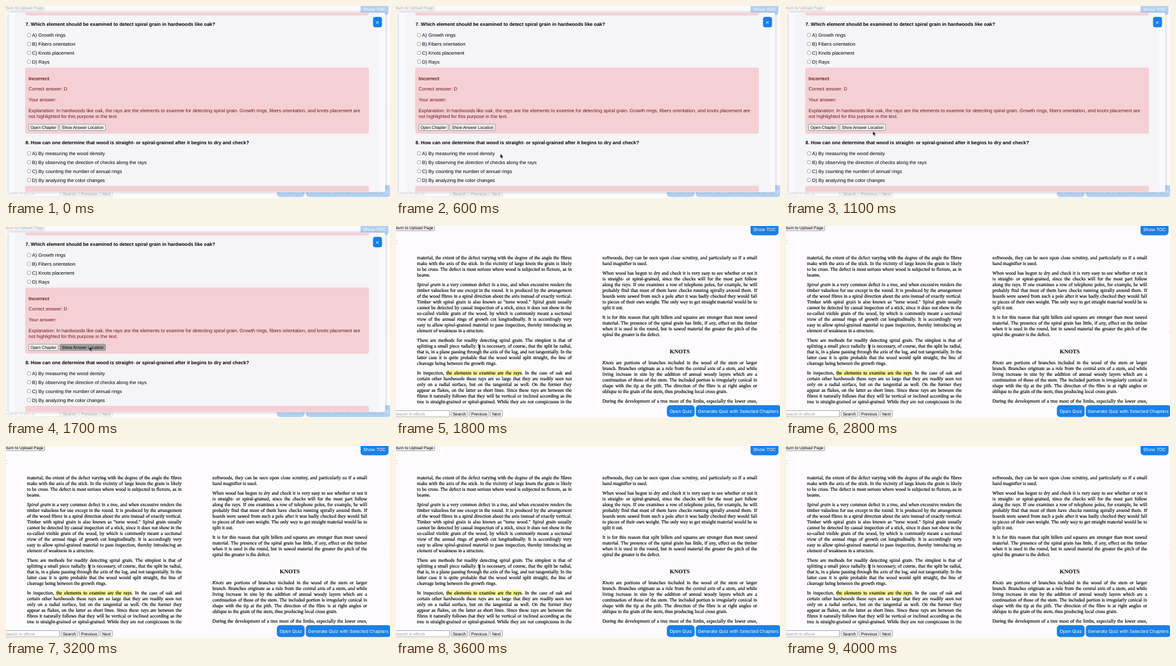
These frames come from a looping animation (600x300 px, 4100 ms). An HTML page:

```html
<!DOCTYPE html>
<html lang="en">
<head>
<meta charset="utf-8">
<title>Quiz answer location</title>
<style>
html, body { margin: 0; width: 100%; height: 100%; overflow: hidden; }
body { position: relative; background: #fdfbfe; text-rendering: geometricPrecision; }
svg, .col { position: absolute; }
svg { left: 0; top: 0; font-family: "Liberation Sans", Arial, sans-serif; font-size: 7.5px; }
.col {
  width: 241.7px; font: 7.5px/9.03px "Liberation Serif", "Times New Roman", serif;
  color: #000; -webkit-text-stroke: .16px #000;
  white-space: nowrap; text-align: justify; text-align-last: justify;
}
.col p { margin: 0 0 5.75px; }
.end { display: block; text-align-last: left; }
mark { background: #fbf593; color: inherit; padding: .3px 0; }
.btn rect { fill: #efefef; stroke: #777; stroke-width: .6; }
.btn text { font-size: 6.45px; text-anchor: middle; fill: #000; }
.blue rect { fill: #1b80e6; }
.blue text { font: 7px Inter, sans-serif; text-anchor: middle; fill: #fff; }
.q { font-weight: bold; }
.radio { fill: #fff; stroke: #777; stroke-width: .6; }
.note { fill: #f4d0d4; stroke: #f1c5ca; stroke-width: .6; }
.red text { fill: #6f1722; }
.press rect { animation: press 4.1s infinite step-end; }
#modal { animation: modal 4.1s infinite step-end; }
#beam { animation: beam 4.1s infinite step-end; }
#arrow { animation: move 4.1s infinite; }
@keyframes modal { 0% { visibility: visible; } 43.9%, 100% { visibility: hidden; } }
@keyframes beam { 0% { visibility: hidden; } 43.9%, 100% { visibility: visible; } }
@keyframes press { 0% { fill: #efefef; } 36.58%, 100% { fill: #a3a0a3; } }
@keyframes move {
  0% { opacity: 0; transform: translate(180px, 272px); animation-timing-function: step-end; }
  7.31% { opacity: 1; transform: translate(180px, 272px); animation-timing-function: steps(3, end); }
  14.63% { opacity: 1; transform: translate(163px, 230.8px); animation-timing-function: steps(6, end); }
  29.26% { opacity: 1; transform: translate(130.3px, 188.3px); animation-timing-function: step-end; }
  43.9%, 100% { opacity: 0; transform: translate(130.3px, 188.3px); }
}
</style>
</head>
<body>
<div class="col" style="left:32.8px;top:45.3px">
<p>material, the extent of the defect varying with the degree of the angle the fibres<br>
make with the axis of the stick. In the vicinity of large knots the grain is likely<br>
to be cross. The defect is most serious where wood is subjected to flexure, as in
<span class="end">beams.</span></p>
<p><i>Spiral grain</i> is a very common defect in a tree, and when excessive renders the<br>
timber valueless for use except in the round. It is produced by the arrangement<br>
of the wood fibres in a spiral direction about the axis instead of exactly vertical.<br>
Timber with spiral grain is also known as "torse wood." Spiral grain usually<br>
cannot be detected by casual inspection of a stick, since it does not show in the<br>
so-called visible grain of the wood, by which is commonly meant a sectional<br>
view of the annual rings of growth cut longitudinally. It is accordingly very<br>
easy to allow spiral-grained material to pass inspection, thereby introducing an
<span class="end">element of weakness in a structure.</span></p>
<p>There are methods for readily detecting spiral grain. The simplest is that of<br>
splitting a small piece radially. It is necessary, of course, that the split be radial,<br>
that is, in a plane passing through the axis of the log, and not tangentially. In the<br>
latter case it is quite probable that the wood would split straight, the line of
<span class="end">cleavage being between the growth rings.</span></p>
<p>In inspection, <mark>the elements to examine are the rays</mark>. In the case of oak and<br>
certain other hardwoods these rays are so large that they are readily seen not<br>
only on a radial surface, but on the tangential as well. On the former they<br>
appear as flakes, on the latter as short lines. Since these rays are between the<br>
fibres it naturally follows that they will be vertical or inclined according as the<br>
tree is straight-grained or spiral-grained. While they are not conspicuous in the</p>
</div>
<div class="col" style="left:322.6px;top:45.3px">
<p>softwoods, they can be seen upon close scrutiny, and particularly so if a small
<span class="end">hand magnifier is used.</span></p>
<p>When wood has begun to dry and check it is very easy to see whether or not it<br>
is straight- or spiral-grained, since the checks will for the most part follow<br>
along the rays. If one examines a row of telephone poles, for example, he will<br>
probably find that most of them have checks running spirally around them. If<br>
boards were sawed from such a pole after it was badly checked they would fall<br>
to pieces of their own weight. The only way to get straight material would be to
<span class="end">split it out.</span></p>
<p>It is for this reason that split billets and squares are stronger than most sawed<br>
material. The presence of the spiral grain has little, if any, effect on the timber<br>
when it is used in the round, but in sawed material the greater the pitch of the
<span class="end">spiral the greater is the defect.</span></p>
</div>
<div class="col" style="left:322.6px;top:209.3px">
<p><i>Knots</i> are portions of branches included in the wood of the stem or larger<br>
branch. Branches originate as a rule from the central axis of a stem, and while<br>
living increase in size by the addition of annual woody layers which are a<br>
continuation of those of the stem. The included portion is irregularly conical in<br>
shape with the tip at the pith. The direction of the fibre is at right angles or
<span class="end">oblique to the grain of the stem, thus producing local cross grain.</span></p>
<p>During the development of a tree most of the limbs, especially the lower ones,</p>
</div>

<svg width="600" height="300" viewBox="0 0 600 300">
  <defs>
    <filter id="shadow" x="-5%" y="-5%" width="110%" height="110%">
      <feDropShadow dx="0" dy="0" stdDeviation="2" flood-opacity=".3"/>
    </filter>
    <clipPath id="pane"><rect x="4.5" y="10.5" width="588" height="280"/></clipPath>
  </defs>

  <g id="page">
    <text x="443.4" y="199.4" text-anchor="middle" font-family="Liberation Serif, Times New Roman, serif" font-size="8.9" font-weight="bold">KNOTS</text>
    <path d="M0 23h2M0 27.5h2M598.5 155.500h1.500M598.500 165.500h1.500" stroke="#bbb" stroke-width=".7"/>
    <g class="btn">
      <rect x="-14" y="-3" width="74.500" height="10.400" rx="1.500"/>
      <text x="58.300" y="4.900" style="text-anchor:end">Return to Upload Page</text>
      <rect x="-10" y="288.300" width="93.700" height="9.800" style="fill:#fff"/>
      <text x="45.500" y="295.500" style="text-anchor:end;fill:#999">Search in eBook</text>
    </g>
    <g class="btn" id="finder"></g>
    <g class="blue" id="actions"></g>
  </g>

  <g id="modal">
    <rect width="600" height="300" fill="#fdfbfe" opacity=".66"/>
    <rect x="4.500" y="10.500" width="588" height="280" rx="2" fill="#f9f9fb" filter="url(#shadow)"/>
    <rect x="14.500" y="10.500" width="568.500" height="280" fill="#f5f4f7"/>
    <g clip-path="url(#pane)">
      <rect class="note" x="30.500" y="0" width="536" height="14.300" rx="2"/>
      <rect class="note" x="30.500" y="96.700" width="536" height="102.300" rx="2"/>
      <rect class="note" x="30.500" y="281.500" width="536" height="30" rx="2"/>
    </g>
    <text class="q" x="30.500" y="31">7. Which element should be examined to detect spiral grain in hardwoods like oak?</text>
    <text class="q" x="30.500" y="215.800">8. How can one determine that wood is straight- or spiral-grained after it begins to dry and check?</text>
    <g id="options"></g>
    <g class="red">
      <text class="q" x="35.300" y="115.800">Incorrect</text>
      <text x="35.300" y="132.200">Correct answer: D</text>
      <text x="35.300" y="149">Your answer:</text>
      <text x="35.300" y="165.600">Explanation: In hardwoods like oak, the rays are the elements to examine for detecting spiral grain. Growth rings, fibers orientation, and knots placement are</text>
      <text x="35.300" y="174.800">not highlighted for this purpose in the text.</text>
    </g>
    <g class="btn" id="chapter"></g>
    <g class="btn press" id="locate"></g>
    <rect x="573.500" y="17" width="14" height="16.300" rx="3.500" fill="#167fe9"/>
    <path d="M578.300 23.700l4 4m0-4l-4 4" stroke="#fff" stroke-width=".9"/>
  </g>

  <path id="arrow" d="M0 0V7L1.600 5.600 2.700 8.200 3.900 7.700 2.800 5.200H5Z" fill="#000" stroke="#fff" stroke-width=".5"/>
  <path id="beam" d="M129 186q1.500 0 1.500 1v5q0 1-1.500 1M132 186q-1.500 0-1.500 1v5q0 1 1.500 1M129.700 189.800h1.600" fill="none" stroke="#111" stroke-width=".7"/>
</svg>

<script>
const add = (id, markup) => document.getElementById(id).insertAdjacentHTML("beforeend", markup);

function button(id, label, x, y, w, h, rx, drop) {
  add(id, `<rect x="${x}" y="${y}" width="${w}" height="${h}" rx="${rx}"/>` +
    `<text x="${x + w / 2}" y="${y + h / 2 + drop}">${label}</text>`);
}

const small = (id, label, x, y, w) => button(id, label, x, y, w, 9.8, 1.5, 2.3);
small("finder", "Search", 86, 288.3, 26);
small("finder", "Previous", 114.6, 288.3, 30.5);
small("finder", "Next", 147.3, 288.3, 19);
small("chapter", "Open Chapter", 35.5, 184.8, 46);
small("locate", "Show Answer Location", 84, 184.8, 71.5);

const big = (label, x, y, w) => button("actions", label, x, y, w, 18.4, 5, 2.5);
big("Show TOC", 554, -3.9, 43.7);
big("Open Quiz", 423.2, 280.1, 43.4);
big("Generate Quiz with Selected Chapters", 468.4, 280.1, 133);

function options(top, labels) {
  labels.forEach((label, i) => {
    const y = top + i * 13.85;
    add("options", `<circle class="radio" cx="36" cy="${y}" r="2.9"/>` +
      `<text x="40.800" y="${y + 2.7}">${"ABCD"[i]}) ${label}</text>`);
  });
}
options(45.4, ["Growth rings", "Fibers orientation", "Knots placement", "Rays"]);
options(230.3, ["By measuring the wood density", "By observing the direction of checks along the rays",
  "By counting the number of annual rings", "By analyzing the color changes"]);
</script>
</body>
</html>
```
